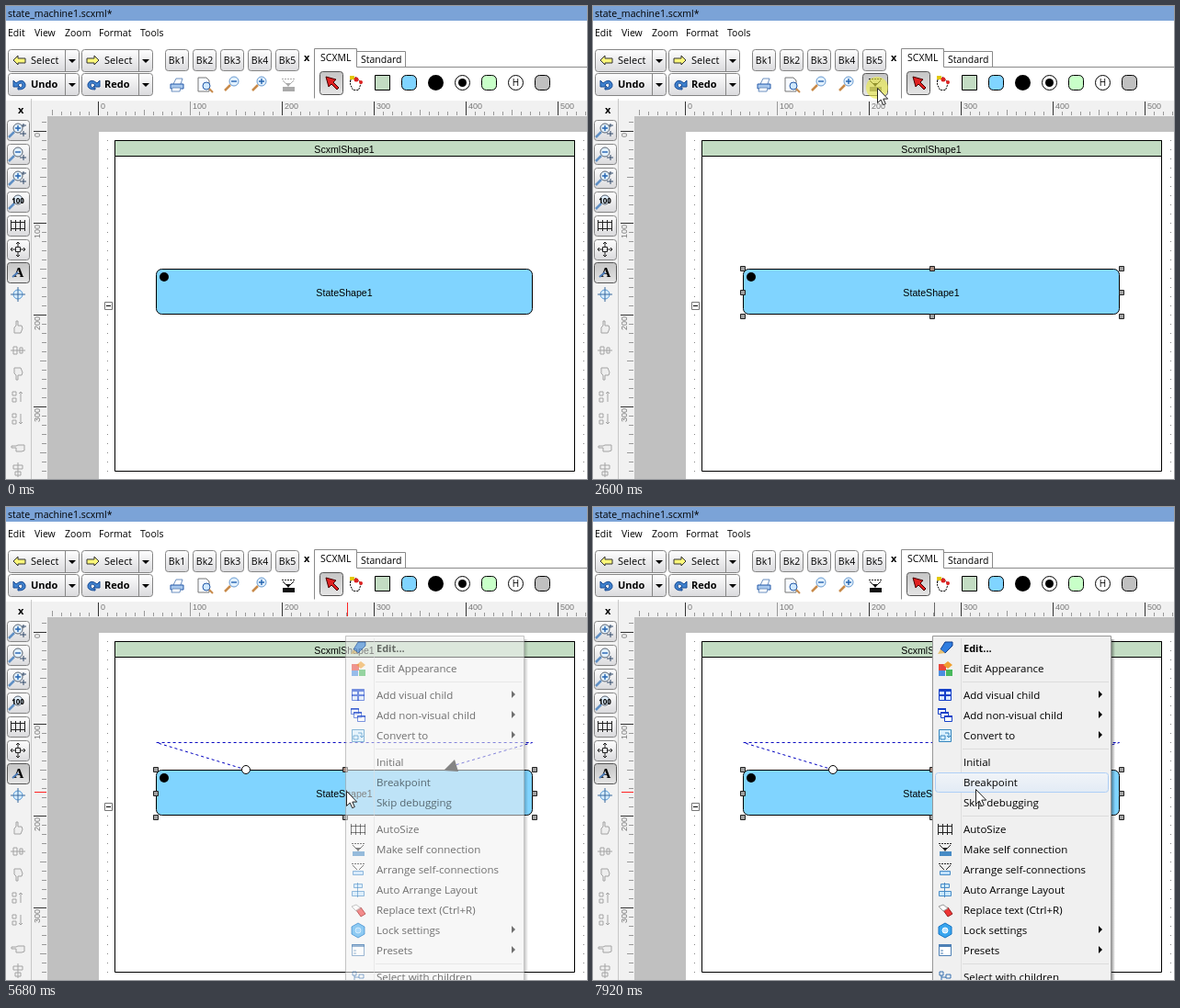
An HTML page with a canvas for the animation above (7.99 s loop, 632 by 515 pixels).

```html
<!DOCTYPE html>
<html lang="en">
<head>
<meta charset="utf-8">
<title>State editor</title>
<style>
  html, body { margin: 0; width: 100%; height: 100%; overflow: hidden; background: #fff; }
  canvas { display: block; width: 632px; height: 515px; }
</style>
</head>
<body>
<canvas id="stage" width="632" height="515"></canvas>
<script>
const LOOP = 7990, STEP = 70;
const UI = '"Open Sans", "Noto Sans", sans-serif';
const ARIAL = '"Liberation Sans", sans-serif';
const BLUE = '#80d4ff', GREEN = '#c3dcc3', NAVY = '#2459a8', RED = '#f22';
const ctx = document.getElementById('stage').getContext('2d');

// start, number of steps, from, bend, to
const MOVES = [
  [620, 7, [475, 446], [462, 370], [439, 324]],
  [1630, 12, [439, 324], [370, 200], [309, 89]],
  [3790, 10, [309, 89], [508, 225], [363, 324]],
  [4880, 3, [363, 324], [367, 316], [370, 309]],
  [6490, 8, [370, 309], [392, 306], [412, 293]],
  [7180, 4, [412, 293], [413, 287], [414, 281]],
  [7780, 3, [414, 281], [415, 294], [416, 307]]
];
const FADE = [[5480, .15], [5610, .35], [5680, .55], [5750, .78], [5820, 1]];
const MENU_START = FADE[0][0], MENU_SOLID = FADE.at(-1)[0];

function cursorAt(t) {
  const move = MOVES.findLast(m => t >= m[0]);
  if (!move) return null;
  const [start, steps, a, b, c] = move;
  const p = Math.min(1, (Math.floor((t - start) / STEP) + 1) / steps);
  const e = p * p * (3 - 2 * p);
  return [0, 1].map(i => Math.round((1 - e) ** 2 * a[i] + 2 * e * (1 - e) * b[i] + e * e * c[i]));
}

function box(x, y, w, h, fill, stroke, r = 0) {
  ctx.beginPath();
  if (stroke) ctx.roundRect(x + .5, y + .5, w - 1, h - 1, r);
  else ctx.roundRect(x, y, w, h, r);
  if (fill) { ctx.fillStyle = fill; ctx.fill(); }
  if (stroke) { ctx.strokeStyle = stroke; ctx.stroke(); }
}
function disc(x, y, r, fill, stroke) {
  ctx.beginPath();
  ctx.arc(x, y, r, 0, 7);
  if (fill) { ctx.fillStyle = fill; ctx.fill(); }
  if (stroke) { ctx.strokeStyle = stroke; ctx.stroke(); }
}
function icon(x, y, path, stroke, fill, width = 1) {
  const shape = new Path2D(path);
  ctx.save();
  ctx.translate(x, y);
  ctx.lineWidth = width;
  if (fill) { ctx.fillStyle = fill; ctx.fill(shape); }
  if (stroke) { ctx.strokeStyle = stroke; ctx.stroke(shape); }
  ctx.restore();
}
function dashed(x, y, path, color, dash) {
  ctx.setLineDash(dash);
  icon(x, y, path, color);
  ctx.setLineDash([]);
}
function text(s, x, y, { size = 10.5, family = UI, weight = 400, color = '#000', align = 'left' } = {}) {
  ctx.font = `${weight} ${size}px ${family}`;
  ctx.fillStyle = color;
  ctx.textAlign = align;
  ctx.fillText(s, x, y);
}
function shade(x0, y0, x1, y1, from, to) {
  const g = ctx.createLinearGradient(x0, y0, x1, y1);
  g.addColorStop(0, from);
  g.addColorStop(1, to);
  return g;
}
const shadeDown = (y, h, top, bottom) => shade(0, y, 0, y + h, top, bottom);

function button(x, y, w, h, pressed) {
  const fill = pressed ? shadeDown(y, h, '#c4c4c4', '#e6e6e6') : shadeDown(y, h, '#fff', '#d9d9dc');
  box(x, y, w, h, fill, pressed ? '#555' : '#858585', 3);
}
function lens(x, y, sign, rim = '#6799cf', handle = '#c88a4a') {
  icon(x, y, 'M-2 2L-8 8', handle, null, 2.5);
  disc(x + 2, y - 2, 5, '#e2f1ff', rim);
  icon(x + 2, y - 2, sign, '#2464b0', null, 1.4);
}
const MINUS = 'M-3 0H3', PLUS = 'M-3 0H3M0-3V3';
const GRID = 'M-8-3.5H8M-8 3.5H8M-7.5-6V6M-2.5-6V6M2.5-6V6M7.5-6V6';

function splitButton(x, y, label, weight, path, stroke, fill) {
  button(x, y, 78, 25);
  icon(x + 6, y + 7, path, stroke, fill);
  text(label, x + 25, y + 16, { size: 11, weight });
  icon(x + 62.5, y, 'M0 1V24', '#858585');
  icon(x + 70, y + 11, 'M-4 0H4L0 4Z', null, '#000');
}

function selfLinkIcon(x, y, color, bar = color) {
  dashed(x, y, 'M-7-6.5H8', color, [2, 1]);
  icon(x, y, 'M-6-5L-2-1M6-5L2-1', color);
  icon(x, y, 'M-3-2H3L0 2Z', null, color);
  box(x - 6, y + 2, 13, 5, bar);
}

function toolbars(linkReady, linkState) {
  box(0, 0, 632, 16, '#7ba3d7');
  text('state_machine1.scxml*', 2, 12);
  [['Edit', 2], ['View', 31], ['Zoom', 64], ['Format', 101], ['Tools', 146]].forEach(([s, x]) => text(s, x, 33));

  splitButton(2, 47, 'Select', 400, 'M0 5L5 0V3H13V8H5V10Z', '#333', '#fbf77a');
  splitButton(82, 47, 'Select', 400, 'M13 5L8 0V3H0V8H8V10Z', '#333', '#fbf77a');
  splitButton(2, 73, 'Undo', 700, 'M0 1V8H7L5 6Q9 2 10 6Q10 9 5 9V11Q14 11 13 5Q10-2 3 4Z', '#174a94', '#3f82cf');
  splitButton(82, 73, 'Redo', 700, 'M14 1V8H7L9 6Q5 2 4 6Q4 9 9 9V11Q0 11 1 5Q4-2 11 4Z', '#174a94', '#3f82cf');
  for (let i = 0; i < 5; i++) {
    button(173 + 30 * i, 47, 26, 24);
    text('Bk' + (i + 1), 186 + 30 * i, 63, { align: 'center' });
  }

  icon(186, 86, 'M-4-1L-1-7H6L4-1', '#6b8fc0', '#fff');
  icon(186, 86, 'M-7-1H7V4H-7Z', NAVY, '#a9c9ee');
  icon(186, 86, 'M-5 3H4L3 7H-6Z', '#6b8fc0', '#fff');
  icon(215, 86, 'M-6-8H3L6-5V7H-6Z', '#777', '#f8fbff');
  disc(218, 87, 4, '#cfe8ff', NAVY);
  icon(221, 90, 'M0 0L4 4', '#c88a4a', null, 2);
  lens(246, 84, MINUS);
  lens(276, 84, PLUS);
  if (linkState) button(293, 73, 28, 25, linkState === 'pressed');
  selfLinkIcon(307, 86, linkReady ? '#111' : '#aaa', linkState === 'pressed' ? '#777' : undefined);
  text('x', 324, 60, { size: 11, weight: 700 });

  icon(335.5, 46.5, 'M0 54V0H46V20M46 3H99V20M46 20H297', '#8a8a8a');
  text('SCXML', 342, 60);
  text('Standard', 386, 62);
  button(341, 71, 26, 26, true);
  icon(348, 77, 'M0 0L3 11L6 8L12 14L14 12L8 6L11 3Z', '#400', '#e02020');
  dashed(380.5, 84.5, 'M-6-4L0-7L6-1L3 7H-3L-6 1Z', '#000', [2, 1]);
  box(374, 76, 5, 4, '#e2c800');
  disc(381, 80, 2.5, '#d22');
  disc(386, 83, 2, '#d22');
  box(401, 75, 17, 17, GREEN, '#000');
  [[430, BLUE], [517, '#c8ffc8'], [575, '#c0c0c0']].forEach(([x, c]) => box(x, 75, 17, 17, c, '#000', 5));
  disc(467.5, 83.5, 8.5, '#000');
  disc(496.5, 83.5, 8, '#fff', '#000');
  disc(496.5, 83.5, 4.5, '#000');
  disc(554.5, 83.5, 8, '#fff', '#000');
  text('H', 554.5, 87, { size: 10, align: 'center' });
}

function sidebar() {
  box(0, 103, 27, 412, '#f2f2f2');
  text('x', 13, 117, { size: 11, weight: 700 });
  [135, 161, 187, 213, 239, 265, 290].forEach((y, i) => button(1, y - 11, 25, 23, i === 6));
  const rim = '#59636f', handle = '#5f8fc4';
  [135, 161, 187].forEach((y, i) => {
    lens(11, y, i === 1 ? MINUS : PLUS, rim, handle);
    icon(18, y, 'M-3 4H4M1 1V7' + (i === 1 ? '' : 'M-1-5H4M1-7V-3'), '#334b6b');
  });
  lens(11, 213, '', rim, handle);
  text('100', 13, 215, { size: 8, weight: 700, align: 'center' });
  icon(13, 239, GRID, '#222');
  icon(13, 265, 'M0-8V-3M0 3V8M-8 0H-3M3 0H8M-2-6L0-8L2-6M-2 6L0 8L2 6M-6-2L-8 0L-6 2M6-2L8 0L6 2M-2.5-2.5H2.5V2.5H-2.5Z', '#222');
  text('A', 14, 295, { size: 15, weight: 700, family: '"Liberation Serif", serif', align: 'center' });
  icon(7, 295, 'M0 0L6-5', '#4a7ab6', null, 2);
  disc(13, 314, 5, '#d7edff', '#5a9ad4');
  icon(13, 314, 'M-8 0H8M0-8V8', '#3a6b9d');
  const grey = '#a3a3a3';
  icon(13, 350, 'M-4 6V0L-2-2V-7H0V-2H4L5 1L3 6Z', grey, '#eee');
  icon(13, 375, 'M-8 0H8M-5-4H-1V4H-5ZM2-3H5V3H2Z', grey);
  icon(13, 400, 'M-4-6V0L-2 2V7H0V2H4L5-1L3-6Z', grey, '#eee');
  [425, 449].forEach((y, i) => icon(13, y, 'M-6-5H-2V-1H-6ZM-6 2H-2V6H-6ZM3-5V6' + (i ? 'M1 4L3 6L5 4' : 'M1-3L3-5L5-3'), grey));
  icon(13, 481, 'M7-3H0L-2-2H-7V0H-2V4H4L7 3Z', grey, '#eee');
  icon(13, 505, 'M0-8V8M-5-5H5V-1H-5ZM-3 2H3V6H-3Z', grey);
}

function rulers(cursor, t) {
  box(27, 103, 605, 17, '#f1f1f1');
  box(28, 120, 17, 395, '#f1f1f1');
  icon(27.5, 101, 'M0 0V414', '#c8c8c8');
  const label = { size: 9, family: ARIAL, color: '#777' };
  for (let x = 50; x < 632; x += 10) {
    const major = x % 100 === 0;
    icon(x + .5, 119, `M0 0V${major ? -15 : x % 50 ? -4 : -6}`, major && x !== 200 ? '#333' : '#999');
    if (major) text(String(x - 100), x + 3, 112, label);
  }
  for (let y = 126; y < 515; y += 10) {
    const major = y % 100 === 36;
    icon(44, y + .5, `M0 0H${major ? -14 : y % 50 === 36 ? -7 : -5}`, major ? '#333' : '#999');
    if (!major) continue;
    ctx.save();
    ctx.translate(37, y + 2);
    ctx.rotate(-Math.PI / 2);
    text(String(y - 136), 0, 0, { ...label, align: 'right' });
    ctx.restore();
  }
  if (!cursor || cursor[1] < 120) return;
  const [x, y] = cursor;
  icon(31, y + 1.5, 'M0 0H13', RED);
  if (t > 2700) icon(x + 1.5, 104, 'M0 0V15', t < MENU_SOLID ? RED : '#666');
}

function diagram(selected, linked) {
  box(45, 120, 587, 395, '#c0c0c0');
  box(101, 137, 531, 378, '#fff');
  for (let y = 146; y < 515; y += 10) [110, 628].forEach(x => box(x, y, 1, 1, '#888'));
  box(118, 146, 501, 361, '#fff', '#000');
  box(118, 146, 501, 18, GREEN, '#000');
  const label = { size: 10.6, family: ARIAL, align: 'center' };
  text('ScxmlShape1', 368, 160, label);
  box(107, 322, 9, 9, '#fff', '#777');
  icon(109, 326.5, 'M0 0H5', '#000');

  box(163, 286, 410, 50, BLUE, '#000', 6);
  disc(172, 295, 5, '#000');
  text('StateShape1', 368, 316, label);
  if (linked) {
    dashed(0, 0, 'M261 286L163.5 256.5H572.5L485 282', '#0000c0', [3, 3]);
    icon(476, 287, 'M0 0L12-12L16 1Z', null, '#000');
  }
  if (selected) {
    for (const x of [163, 369, 575]) for (const y of [286, 312, 338]) {
      if (x === 369 && y === 312) continue;
      box(x - 3, y - 3, 6, 6, x === 369 && y === 286 ? '#a88c80' : '#a0a0a0', '#222');
    }
  }
  if (linked) disc(261, 286, 4.5, '#fff', '#000');
}

const ITEMS = [
  ['Edit...', 154], ['Edit Appearance', 176],
  ['Add visual child', 205, true], ['Add non-visual child', 227, true], ['Convert to', 249, true],
  ['Initial', 278], ['Breakpoint', 300], ['Skip debugging', 322],
  ['AutoSize', 351], ['Make self connection', 373], ['Arrange self-connections', 395],
  ['Auto Arrange Layout', 417], ['Replace text (Ctrl+R)', 439],
  ['Lock settings', 461, true], ['Presets', 483, true], ['Select with children', 512]
];

function menuIcons() {
  const x = 383;
  icon(x, 154, 'M-5 1L0-7H8V-3L0 5Z', '#123f8c', '#2f7de0');
  icon(x, 154, 'M-8 6L-5 1L0 5Z', null, '#e8c070');
  box(376, 171, 8, 7, '#e8453c');
  icon(x + 3, 172, 'M0-4L5 0L0 4L-5 0Z', null, '#f0a030');
  box(376, 178, 7, 6, '#4a8de0');
  box(384, 177, 7, 7, '#48b85c');
  box(376, 198, 14, 13, '#d8e8ff', '#1540c8');
  icon(x, 205, 'M-7 0H7M0-6V6M-6-5H6', '#1540c8', null, 2);
  [[375, 219], [378, 223], [382, 227]].forEach(([a, b]) => {
    box(a, b, 9, 7, '#fff', '#1540c8');
    box(a, b, 9, 2, '#1540c8');
  });
  box(376, 242, 14, 14, '#d8f0ff', '#3585bd');
  icon(x, 249, 'M-5 4H0V0H-5ZM0-3H4V2M2 0L4 2L6 0', '#3585bd');
  icon(x, 351, GRID, '#222');
  selfLinkIcon(x, 373, '#222', '#478bc5');
  dashed(x, 395, 'M-7-6.5H8', '#222', [2, 1]);
  icon(x, 395, 'M-6-5L-1 0M6-5L1 0', '#222');
  box(377, 396, 12, 5, '#bfe0ff', '#478bc5');
  box(378, 410, 10, 5, '#c9e8ff', '#478bc5');
  box(376, 418, 14, 6, '#c9e8ff', '#478bc5');
  icon(x, 417, 'M-.5-8V8', '#478bc5');
  icon(x, 439, 'M-2 0L3-3L8 4L3 7Z', '#922', '#e33');
  icon(x, 439, 'M-7-4L-2-6L3-2L-2 1Z', '#999', '#fff');
  icon(x, 461, 'M0-8L7-4V4L0 8L-7 4V-4Z', '#1674c4', '#38a5ee');
  disc(x, 461, 3, '#bde4ff', '#fff');
  box(376, 476, 14, 13, '#fff', '#4e80b5');
  box(376, 476, 14, 3, '#4e80b5');
  icon(x, 483, 'M-5 0H-2M-5 3H-2', '#4e80b5');
  icon(x, 512, 'M-6-6H-2V-2H-6ZM-4-2V4H1M1-3H6V1H1ZM-4 0H1', '#3670b0');
}

function menu(alpha, hovered) {
  ctx.save();
  ctx.globalAlpha = alpha;
  box(564, 144, 4, 371, shade(564, 0, 568, 0, 'rgba(0,0,0,.4)', 'rgba(0,0,0,0)'));
  box(369, 140, 195, 380, '#f0f0f0', '#979797');
  icon(400.5, 143, 'M0 0V372', '#dedede');
  [190, 263, 336, 497].forEach(y => icon(402, y + .5, 'M0 0H159', '#dcdcdc'));
  if (hovered) box(372, hovered, 189, 22, shadeDown(hovered, 22, '#f1f4f8', '#e2ebf5'), '#aecff7', 3);
  menuIcons();
  ITEMS.forEach(([s, y, submenu], i) => {
    text(s, 403, y + 4, { size: i ? 11.5 : 11, weight: i ? 400 : 700 });
    if (submenu) icon(550, y - 1, 'M0-4L4 0L0 4Z', null, '#000');
  });
  ctx.restore();
}

function pointer([x, y], halo) {
  if (halo) disc(x, y, 12, 'rgba(235,235,65,.6)');
  icon(x + .5, y + .5, 'M0 0V16L3.7 12.6L6.2 18.2L8.8 17L6.3 11.6H11.2Z', '#222', '#fff');
}

function render(t) {
  const cursor = cursorAt(t);
  const selected = t >= 1170;
  const linked = t >= 2670;
  const overLink = cursor && cursor[1] < 98 && cursor[0] < 322;
  const linkState = overLink && (t >= 2470 && t < 2740 ? 'pressed' : 'hover');
  const fade = FADE.findLast(f => t >= f[0]);
  const hovered = fade && cursor[0] > 372 ? (cursor[1] < 289 ? 267 : 289) : 0;

  box(0, 0, 632, 515, '#fff');
  toolbars(selected, linkState);
  diagram(selected, linked);
  // the ruler marks stay put while the menu is open
  rulers(cursorAt(Math.min(t, MENU_START)), t);
  sidebar();
  if (fade) menu(fade[1], hovered);
  if (cursor) pointer(cursor, !fade);
}

const began = performance.now();
function tick() {
  render((performance.now() - began) % LOOP);
  requestAnimationFrame(tick);
}
tick();
</script>
</body>
</html>
```
